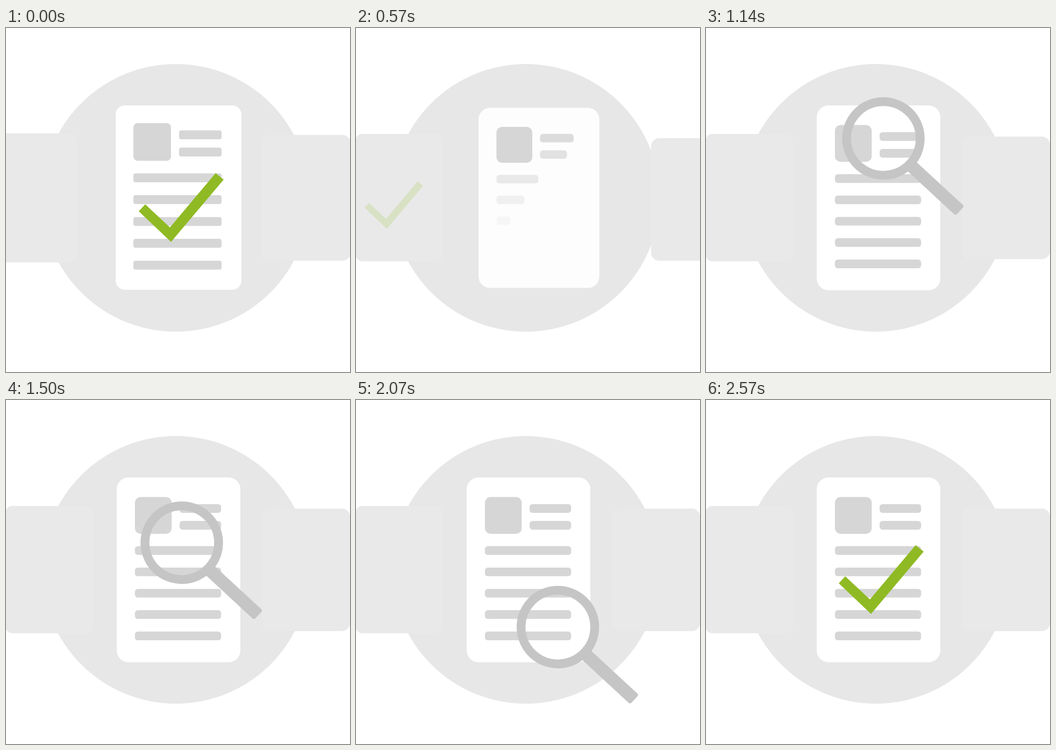
An HTML page with a canvas for the animation above (2.87 s loop, 640 by 640 pixels).

```html
<!DOCTYPE html>
<html lang="en">
<head>
<meta charset="utf-8">
<title>Document check</title>
<style>
  html, body { margin: 0; width: 100%; height: 100%; overflow: hidden; background: #fff; }
  canvas { display: block; width: 100vmin; height: 100vmin; }
</style>
</head>
<body>
<canvas width="640" height="640"></canvas>
<script>
const ctx = document.querySelector('canvas').getContext('2d');
const LOOP = 2870, FPS = 14, LAST = 36;
const INK = '#d6d6d6', LENS = '#c5c5c5', GREEN = '#8fba23';

const clamp = v => Math.min(1, Math.max(0, v));
const mix = (a, b, p) => a + (b - a) * p;
const easeOut = x => 1 - (1 - clamp(x)) ** 3;

// cubic-bezier(.42, 0, .58, 1), solved by bisection
function ease(x) {
  x = clamp(x);
  let lo = 0, hi = 1;
  for (let i = 0; i < 24; i++) {
    const u = (lo + hi) / 2, v = 1 - u;
    if (1.26 * u * v * v + 1.74 * u * u * v + u ** 3 < x) lo = u; else hi = u;
  }
  return lo * lo * (3 - 2 * lo);
}

function box(x, y, w, h, r, color, alpha = 1) {
  if (w <= 0 || alpha <= 0) return;
  ctx.globalAlpha = alpha;
  ctx.fillStyle = color;
  ctx.beginPath();
  ctx.roundRect(x, y, w, h, r);
  ctx.fill();
  ctx.globalAlpha = 1;
}

function card(cx, cy, w, h, r, shade) {
  box(cx - w / 2, cy - h / 2, w, h, r, `rgb(${shade},${shade},${shade})`);
}

// Draws in a frame scaled by s, with point (px, py) moved to (cx, cy)
function placed(px, py, cx, cy, s, draw) {
  ctx.save();
  ctx.translate(cx, cy);
  ctx.scale(s, s);
  ctx.translate(-px, -py);
  draw();
  ctx.restore();
}

// Picture, two short rows beside it and five long rows below
function content(cx, cy, s, r, alpha, grow) {
  placed(321, 316, cx, cy, s, () => {
    box(237, 177, 70, 70, r, INK, alpha);
    for (let i = 0; i < 7; i++) {
      const g = grow(i);
      if (i < 2) box(322, 190.5 + 32 * i, 79 * g, 16.5, r / 2, INK, alpha * g);
      else box(237, 270.5 + 40.6 * (i - 2), 164 * g, 16.5, r / 2, INK, alpha * g);
    }
  });
}

function check(alpha, cx = 326, cy = 334, s = 1) {
  placed(326, 334, cx, cy, s, () => {
    ctx.globalAlpha = alpha;
    ctx.fillStyle = GREEN;
    ctx.fill(new Path2D('M247 341L259 328L305 371L390 270L405 282L307 398Z'));
    ctx.globalAlpha = 1;
  });
}

// The lens flies in, scans the page and leaves: [curve, from step, to step, x, y]
const moves = [
  [easeOut, 11, 16, 330, 205.5],
  [ease, 16, 18, 363, 215],
  [ease, 19, 23, 291, 316],
  [easeOut, 24, 30, 376, 423],
  [ease, 31, 35, 870, 690]
];

function lens(k) {
  let x = 760, y = 680;
  for (const [curve, from, to, tx, ty] of moves) {
    const p = curve((k - from) / (to - from));
    x = mix(x, tx, p);
    y = mix(y, ty, p);
  }
  ctx.save();
  ctx.translate(x, y);
  ctx.rotate(42.7 * Math.PI / 180);
  ctx.strokeStyle = LENS;
  ctx.lineWidth = 16.5;
  ctx.beginPath();
  ctx.arc(0, 0, 68.5, 0, 7);
  ctx.stroke();
  box(70, -9.5, 126, 23.7, 4, LENS);
  ctx.restore();
}

// The finished document shrinks away to the left
function leaving(k) {
  const p = ease(k / 8), s = mix(1, .691, p ** 1.41);
  card(mix(321, 80.5, p ** 1.08), 315.5, 234 * s, 343 * s, 17 * s, mix(255, 233, p));
  content(321 - 235 * p, 316, 1 - .19 * p, 8, clamp(2 - 2 * p), () => 1);
  if (k < 9) check(1 - .82 * p ** 1.5, 326 - 255.5 * p, 334 - 4.5 * p, 1 - .31 * p ** .8);
}

// The next document grows into the middle, then its rows fill in one by one
function arriving(k) {
  const p = ease(k / 10), cx = mix(557.5, 321, p), h = mix(234, 344, p);
  const shown = (k - 4) / 4;
  card(cx, 316, mix(167, 230, p), h, mix(15, 22, p), mix(233, 255, p));
  content(cx + 1, 316.5, .978 * h / 344, 11, clamp(shown), i => clamp(shown - (i + 1) / 6));
}

function draw(k) {
  ctx.fillStyle = '#fff';
  ctx.fillRect(0, 0, 640, 640);
  ctx.fillStyle = '#e7e7e7';
  ctx.beginPath();
  ctx.arc(316, 316, 249, 0, 7);
  ctx.fill();

  // Neighbouring cards on both sides
  const q = ease((k - 4) / 6);
  card(50 - 280 * ease(k / 8), 316, 164, 240, 12, 233);
  card(mix(873, 558, q), mix(329, 316, q), 164, 228, 15, 233);

  leaving(k);
  arriving(k);
  lens(k);
  if (k > 33) check((k - 33) / 3);
}

function tick() {
  const t = performance.now() % LOOP;
  draw(Math.min(LAST, Math.floor((Math.floor(t / 10) * 10 + 5) * FPS / 1000)));
  requestAnimationFrame(tick);
}
tick();
</script>
</body>
</html>
```
